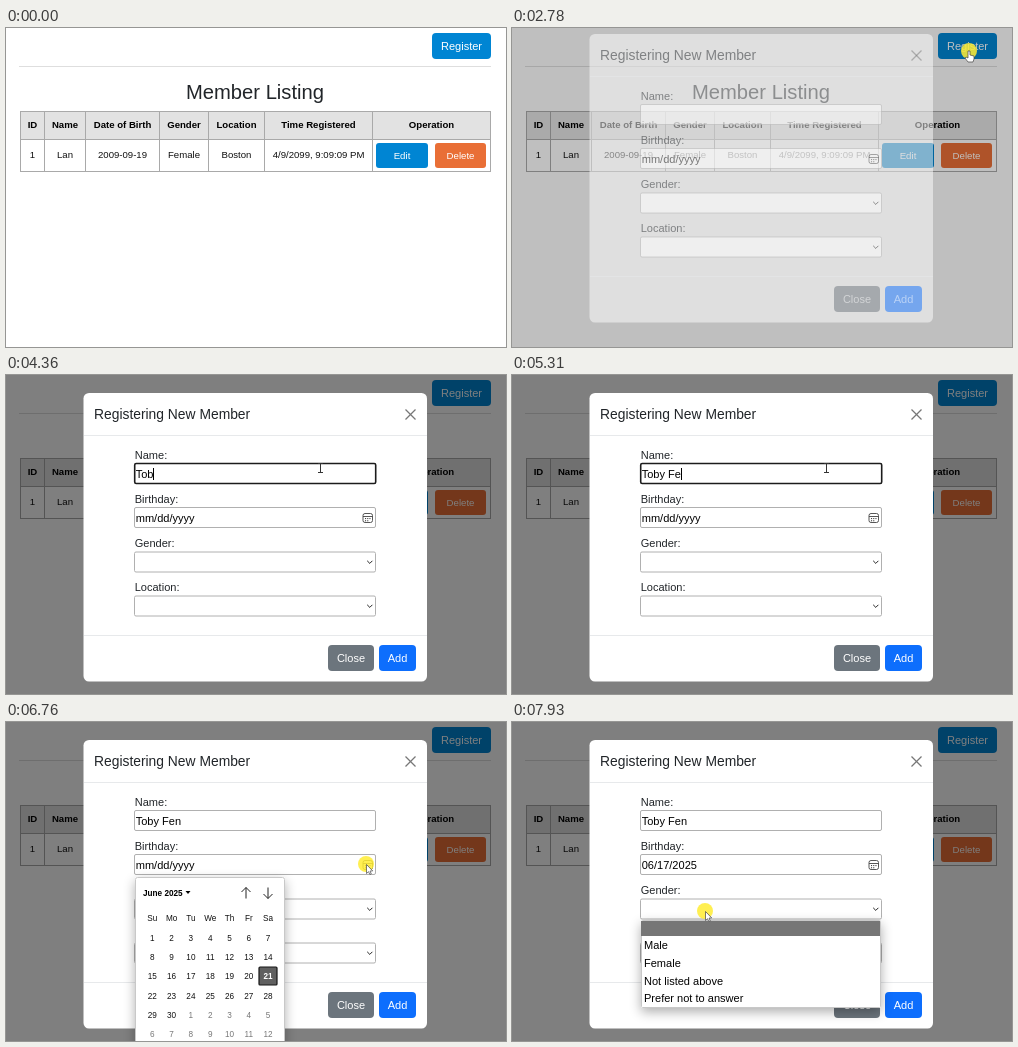
An HTML page with a canvas that plays this animation: 500 by 319 pixels, repeating every 8 s.

```html
<!DOCTYPE html>
<html lang="en">
<head>
<meta charset="utf-8">
<title>Member Listing</title>
<style>
html, body { margin: 0; width: 100%; height: 100%; overflow: hidden; background: #fff; }
canvas { display: block; width: 500px; height: 319px; }
</style>
</head>
<body>
<canvas id="stage" width="500" height="319"></canvas>
<script>
const g = document.getElementById('stage').getContext('2d');
const LOOP = 8000, STEP = 70;
const INK = '#212529';
const NAME = 'Toby Fen';
const KEYS = [3960, 4090, 4290, 4570, 4700, 5110, 5310, 5500];
const CLICKS = [2780, 3400, 6760, 7380, 7860];

// Pointer moves: first step, last step, target x, target y
const START = [491, 319];
const MOVES = [
  [610, 1240, 412, 217], [1450, 1590, 406, 202], [1800, 2220, 457, 23],
  [2990, 3400, 314, 93], [6130, 6130, 317, 94], [6200, 6270, 331, 110],
  [6480, 6620, 360, 142], [6830, 7310, 180, 244], [7580, 7860, 193, 189]
];

const within = (t, a, b) => t >= a && t < b;

function rect(x, y, w, h, fill) {
  g.fillStyle = fill;
  g.fillRect(x, y, w, h);
}

function round(x, y, w, h, r, fill, stroke, width = 1) {
  g.beginPath();
  g.roundRect(x, y, w, h, r);
  if (fill) { g.fillStyle = fill; g.fill(); }
  if (stroke) { g.strokeStyle = stroke; g.lineWidth = width; g.stroke(); }
}

function line(points, color, width = 1) {
  g.beginPath();
  points.forEach(([x, y]) => g.lineTo(x, y));
  g.strokeStyle = color;
  g.lineWidth = width;
  g.stroke();
}

// y is the middle of the capitals
function text(s, x, y, size, color = INK, align = 'left', weight = 400) {
  g.font = `${weight} ${size}px "Liberation Sans", Arial, sans-serif`;
  g.textAlign = align;
  g.fillStyle = color;
  g.fillText(s, x, y + size * 0.36);
}

function button(label, x, y, w, h, size, fill) {
  round(x, y, w, h, size > 10 ? 4 : 3, fill);
  text(label, x + w / 2, y + h / 2, size, '#fff', 'center');
}

function page(hover) {
  rect(0, 0, 500, 319, '#fff');
  button('Register', 426, 5, 59, 26, 11.04, hover ? '#0072b8' : '#0085d3');
  rect(13, 38, 472, 1, '#dedede');
  text('Member Listing', 249, 64, 20.2, INK, 'center');

  const edges = [14, 38, 79, 153, 202, 258, 366, 484];
  const heads = ['ID', 'Name', 'Date of Birth', 'Gender', 'Location', 'Time Registered', 'Operation'];
  const cells = ['1', 'Lan', '2009-09-19', 'Female', 'Boston', '4/9/2099, 9:09:09 PM'];
  const mid = i => (edges[i] + edges[i + 1]) / 2 + 0.5;
  rect(14, 83, 470, 28, '#e2e2e2');
  for (const y of [83, 111, 143]) rect(14, y, 471, 1, '#a9a9a9');
  for (const x of edges) rect(x, 83, 1, 61, '#a9a9a9');
  heads.forEach((s, i) => text(s, mid(i), 97, 9.6, '#000', 'center', 700));
  cells.forEach((s, i) => text(s, mid(i), 127, 9.6, '#111', 'center'));
  button('Edit', 370, 115, 52, 25, 9.66, '#0085d3');
  button('Delete', 429, 115, 51, 25, 9.66, '#e96f36');
}

function field(label, y, focus) {
  text(label, 128.7, y - 8, 11.04);
  if (focus) round(128.7, y + 0.5, 241, 20, 1.5, '#fff', '#1c1c1c', 1.6);
  else round(128.5, y + 0.5, 241, 20, 1.5, '#fff', '#b0b0b0');
}

function chevron(y) {
  line([[361.2, y - 1.2], [363.8, y + 1.4], [366.4, y - 1.2]], '#222');
}

function dateIcon() {
  round(357, 138.5, 9.5, 9, 2, null, '#444', 0.9);
  line([[357, 141.5], [366.5, 141.5]], '#444', 0.9);
  for (let i = 0; i < 5; i++) rect(359 + i % 3 * 2.2, i < 3 ? 143 : 145.2, 1.1, 1.1, '#444');
}

function modal(t) {
  round(77.5, 18, 343.5, 288.5, 5.5, '#fff');
  text('Registering New Member', 88, 39.5, 13.85);
  line([[399.5, 34.5], [409.5, 44.5]], '#777', 1.2);
  line([[409.5, 34.5], [399.5, 44.5]], '#777', 1.2);
  rect(78, 60, 343, 1, '#e7e9eb');
  rect(78, 260, 343, 1, '#e7e9eb');

  const typing = within(t, 3400, 5780), onDate = within(t, 5780, 6760);
  field('Name:', 88, typing);
  field('Birthday:', 132, onDate);
  field('Gender:', 176.5);
  field('Location:', 220.5);

  const typed = NAME.slice(0, KEYS.filter(k => t >= k).length);
  text(typed, 129.7, 99, 11.04, '#000');
  if (typing) rect(Math.round(129.7 + g.measureText(typed).width), 93, 1, 12, '#000');

  const [month, rest] = t < 7450 ? ['mm', '/dd/yyyy'] : ['06', '/17/2025'];
  if (onDate) rect(129.5, 136, 18.5, 14, '#0078d7');
  text(month, 129.7, 143, 11.04, onDate ? '#fff' : '#000');
  text(rest, 129.7 + g.measureText(month).width, 143, 11.04, '#000');
  dateIcon();
  chevron(187);
  chevron(231);
  button('Close', 322, 270, 46, 26, 11.04, '#6c757d');
  button('Add', 373, 270, 37, 26, 11.04, '#0d6efd');
}

function popup(x, y, w, h, r) {
  g.save();
  g.shadowColor = 'rgba(0,0,0,0.32)';
  g.shadowBlur = 12;
  g.shadowOffsetY = 4;
  round(x, y, w, h, r, '#fff');
  g.restore();
  round(x + 0.5, y + 0.5, w - 1, h - 1, r, null, '#c8c8c8');
}

function arrow(x, dir) {
  const tip = 171 + 5.5 * dir;
  line([[x, 171 - 5.5 * dir], [x, tip]], '#222');
  line([[x - 4.5, tip - 4.5 * dir], [x, tip], [x + 4.5, tip - 4.5 * dir]], '#222');
}

function calendar(t) {
  popup(129, 155, 150, 190, 2);
  text('June 2025', 137, 171, 8.2, '#000', 'left', 700);
  g.fillStyle = '#000';
  g.beginPath();
  g.moveTo(179.5, 169);
  g.lineTo(184.5, 169);
  g.lineTo(182, 172);
  g.fill();
  arrow(240, -1);
  arrow(262, 1);

  const colX = c => 146.3 + c * 19.3;
  'Su Mo Tu We Th Fr Sa'.split(' ').forEach((s, c) => text(s, colX(c), 196, 8.2, '#111', 'center'));
  for (let i = 0; i < 42; i++) {
    const x = colX(i % 7), y = 215.7 + Math.floor(i / 7) * 19.3;
    const day = i % 30 + 1, today = i === 20;
    if (today) round(253, 245, 18, 18, 1, '#606060', '#161616', 1.2);
    if (i === 16 && t >= 7310) round(175.5, 245.5, 19, 18, 1, '#e6e6e6', '#8c8c8c');
    text(day, x, y, 8.2, today ? '#fff' : i < 30 ? '#111' : '#777', 'center', today ? 700 : 400);
  }
}

function options() {
  popup(129, 198, 240, 88, 1);
  rect(129, 199, 239, 15, '#767676');
  ['Male', 'Female', 'Not listed above', 'Prefer not to answer']
    .forEach((s, i) => text(s, 132, 223 + i * 17.8, 11.04, '#000'));
}

function pointerAt(t) {
  let [x, y] = START;
  for (const [a, b, tx, ty] of MOVES) {
    if (t < a) break;
    const steps = Math.round((b - a) / STEP) + 1;
    const p = Math.min(1, (Math.floor((t - a) / STEP) + 1) / steps);
    const e = (p + p * p * (3 - 2 * p)) / 2;
    x += (tx - x) * e;
    y += (ty - y) * e;
  }
  return [x, y];
}

function shape(points, x, y) {
  g.beginPath();
  points.forEach(([px, py]) => g.lineTo(x + px, y + py));
  g.closePath();
  g.fillStyle = '#fff';
  g.fill();
  g.strokeStyle = '#444';
  g.lineWidth = 0.7;
  g.stroke();
}

function pointer(t) {
  const [x, y] = pointerAt(t);
  if (CLICKS.some(c => within(t, c, c + STEP) || (c === 7860 && t >= c))) {
    g.fillStyle = 'rgba(255,236,50,0.85)';
    g.beginPath();
    g.arc(x, y, 8, 0, Math.PI * 2);
    g.fill();
  }
  const overField = within(t, 2850, 6760) && x > 128 && x < 354 &&
    ((y > 87 && y < 110) || (y > 131 && y < 154));
  const overButton = t < 2850 && x > 426 && y < 31;
  if (overField) {
    line([[x - 2, y - 4.5], [x + 3, y - 4.5]], '#333');
    line([[x + 0.5, y - 4.5], [x + 0.5, y + 4.5]], '#333');
    line([[x - 2, y + 4.5], [x + 3, y + 4.5]], '#333');
  } else if (overButton) {
    shape([[-1, 0], [1, 0], [1, 4], [5, 5], [5, 8], [4, 11], [-1, 11], [-4, 7], [-3, 6], [-1, 7]], x, y);
  } else {
    shape([[0, 0], [0, 9], [2, 7.2], [3.4, 10], [4.8, 9.4], [3.5, 6.6], [6.2, 6.4]], x + 0.5, y + 0.5);
  }
}

function draw(now) {
  const t = now % LOOP;
  page(within(t, 2150, 2780));
  if (t >= 2780) {
    const opening = t < 2850;
    rect(0, 0, 500, 319, `rgba(0,0,0,${opening ? 0.25 : 0.5})`);
    g.save();
    if (opening) {
      g.globalAlpha = 0.5;
      g.translate(0, -12);
    }
    modal(t);
    g.restore();
  }
  if (within(t, 6760, 7450)) calendar(t);
  if (t >= 7860) options();
  if (t >= 610) pointer(t);
}

const begin = performance.now();
(function tick() {
  draw(performance.now() - begin);
  requestAnimationFrame(tick);
})();
</script>
</body>
</html>
```
